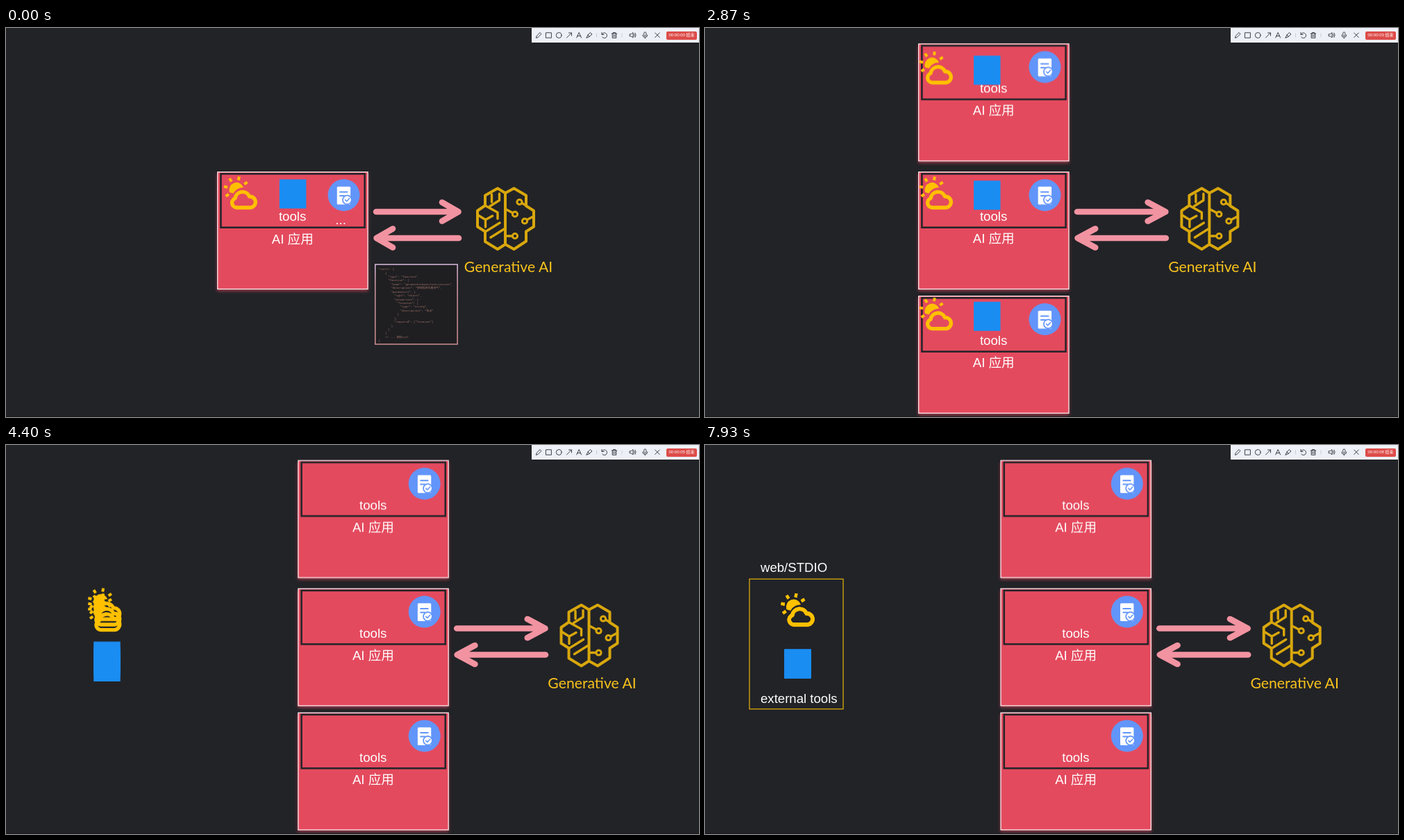
Recreate the animation shown at these times as an HTML page. Size 998 px wide and 561 px high, loop 8 s.

```html
<!DOCTYPE html>
<html lang="zh-CN">
<head>
<meta charset="utf-8">
<title>AI tools</title>
<style>
  @property --sec { syntax: "<integer>"; inherits: true; initial-value: 0; }

  html, body { margin: 0; width: 100%; height: 100%; overflow: hidden; background: #222327; }
  svg { position: absolute; left: 0; top: 0; width: 998px; height: 561px; }
  text, .timer { font-family: "Liberation Sans", Arial, "Noto Sans CJK SC", "Noto Sans CJK", sans-serif; }
  text { font-size: 18.6px; fill: #fff; }
  .mid { text-anchor: middle; }
  .line { fill: none; stroke-linecap: round; stroke-linejoin: round; }

  .timer {
    position: absolute; left: 951px; top: 5px; width: 44px; height: 11.5px;
    border-radius: 2px; background: #dd4c49; color: #fff;
    font-size: 6px; line-height: 11.5px; text-align: center; white-space: nowrap;
    animation: tick 8s step-end infinite;
  }
  .timer::before { counter-reset: s var(--sec); content: "00:00:0" counter(s) " 结束"; }

  /* Everything on the slide travels on the same curve by its own --dx, --dy. */
  .move { --dx: 121.3px; --dy: -.5px; animation: move 8s infinite; }
  .sun { --dx: -204.3px; --dy: calc(0px - var(--o)); }
  .map { --dx: -279.5px; --dy: calc(76.3px - var(--o)); }
  .shift { animation: shift 8s step-end infinite; }
  .stretch { transform-origin: 529px 0; animation: stretch 8s step-end infinite; }
  .dots { animation: cut 8s step-end infinite; }
  .code { animation: codeOut 8s linear infinite; }
  .copy { animation: copyIn 8s linear infinite; }
  .box { animation: boxIn 8s linear infinite; }
  .head { animation: headIn 8s linear infinite; }

  @keyframes move {
    0%, 31.9% { translate: 0 0; animation-timing-function: cubic-bezier(.38, 0, .667, .2); }
    46% { translate: calc(var(--dx) / 2) calc(var(--dy) / 2); animation-timing-function: cubic-bezier(.333, .8, .62, 1); }
    60.1%, 100% { translate: var(--dx) var(--dy); }
  }
  @keyframes shift { 0% { translate: 0 0; } 32.4%, 100% { translate: 4.4px 0; } }
  @keyframes stretch { 0% { scale: 1 1; } 32.4%, 100% { scale: 1.07 1; } }
  @keyframes cut { 0% { opacity: 1; } 32.4%, 100% { opacity: 0; } }
  @keyframes codeOut { 0%, 2.5% { opacity: 1; } 9%, 100% { opacity: 0; } }
  @keyframes copyIn { 0%, 13.5% { opacity: 0; } 20.5%, 100% { opacity: 1; } }
  @keyframes boxIn { 0%, 69% { opacity: 0; } 75%, 100% { opacity: 1; } }
  @keyframes headIn { 0%, 78% { opacity: 0; } 84%, 100% { opacity: 1; } }
  @keyframes tick {
    0% { --sec: 0; } 2.5% { --sec: 1; } 15% { --sec: 2; } 27.5% { --sec: 3; } 40% { --sec: 4; }
    52.5% { --sec: 5; } 65% { --sec: 6; } 77.5% { --sec: 7; } 90%, 100% { --sec: 8; }
  }
</style>
</head>
<body>
<svg viewBox="0 0 998 561">
  <defs>
    <linearGradient id="edge" x1="0" y1="0" x2="0" y2="1">
      <stop offset="0" stop-color="#dcbce0"/>
      <stop offset=".25" stop-color="#d39aa8"/>
      <stop offset="1" stop-color="#cf8f90"/>
    </linearGradient>
    <filter id="blur" x="-10%" y="-10%" width="120%" height="120%"><feGaussianBlur stdDeviation="2"/></filter>

    <g id="card">
      <rect x="304" y="210" width="217.5" height="169.5" fill="#e44a5e" opacity=".6" filter="url(#blur)"/>
      <rect x="304.7" y="207.7" width="216.3" height="168.8" fill="#e44a5e" stroke="#fbe9ec" stroke-width="1.3"/>
      <rect x="309.4" y="210.3" width="207.2" height="77.4" fill="none" stroke="#26252a" stroke-width="2.6"/>
      <circle cx="486.5" cy="241" r="23" fill="#6295fa"/>
      <rect x="476.7" y="228.8" width="19.4" height="25.6" rx="1.5" fill="#fff"/>
      <path class="line" d="M481 236.5H491.5M481 242H487" stroke="#6295fa" stroke-width="2"/>
      <circle cx="491.3" cy="247.8" r="6.4" fill="#fff" stroke="#6295fa" stroke-width="1.7"/>
      <path class="line" d="M488.5 247.8L490.7 250L494.5 245.8" stroke="#6295fa" stroke-width="1.6"/>
      <text class="mid" x="412.6" y="278">tools</text>
      <text class="mid" x="412.8" y="310.5">AI 应用</text>
    </g>

    <g id="sun" fill="#ffc000">
      <path d="M8 24A10.5 10.5 0 0 1 28 17Q18 17 13.5 25.5Z"/>
      <g id="rays" transform="translate(18 19.5)"></g>
      <path class="line" d="M18 46A7 7 0 0 1 16 32.5A10.7 10.7 0 0 1 36.5 30A8 8 0 0 1 38 46Z" stroke="#ffc000" stroke-width="5.4"/>
    </g>

    <rect id="map" width="38.5" height="42" fill="#1a8df2"/>

    <path id="arrow" class="line" d="M533 265H649M628 251.5L651.5 265L628 278.5" stroke="#f293a1" stroke-width="8.6"/>
  </defs>

  <rect width="998" height="561" fill="#222327"/>
  <rect y="560" width="998" height="1" fill="#161719"/>

  <g class="code">
    <rect x="531.7" y="341" width="118.4" height="115" fill="#1f1f22" stroke="url(#edge)" stroke-width="1.5"/>
    <g id="code"></g>
  </g>

  <g id="cards"></g>

  <g class="move">
    <g class="stretch">
      <use href="#arrow"/>
      <use href="#arrow" transform="rotate(180 592.5 284)"/>
    </g>
    <g class="shift">
      <g class="line" stroke="#d8a70d" stroke-width="4">
        <path d="M719 238L731.5 231.3L749 241.5V256.5L760 263.5V286.5L749 293.5V307.5L731.5 319L719 312L708 319L690 308V293.5L679 286.5V263.5L690 256V241.5L708 231.3ZV312"/>
        <path stroke-width="3.4" d="M699.5 240V251M710.5 239V248.5L697 257M690 256L708 266V275M680 270L690.5 276.5L700.5 271M690.5 276.5V287M690 294L711 281M698 302L718 289.5"/>
        <path stroke-width="3.4" d="M743 252.5L749 256M719 261L729.5 266.5M750.5 276.5L760 271.5M719 300H729"/>
        <g stroke-width="3">
          <circle cx="739.5" cy="251" r="3.6"/>
          <circle cx="733" cy="268.5" r="3.6"/>
          <circle cx="747" cy="278.5" r="3.6"/>
          <circle cx="733" cy="300" r="3.6"/>
        </g>
      </g>
      <text class="mid" x="723.5" y="351.7" style="font: 21.2px Lato, sans-serif; fill: #f8c31c">Generative AI</text>
    </g>
  </g>

  <g class="box">
    <rect x="64" y="193.3" width="135" height="187.4" fill="none" stroke="#d9a90e" stroke-width="1.3"/>
    <text x="80" y="372">external tools</text>
  </g>
  <text class="head" x="80" y="183">web/STDIO</text>

  <rect x="757" width="241" height="21" fill="#eef0f8"/>
  <g class="line" stroke="#3d3f48" stroke-width="1">
    <path d="M763.5 14L764.2 11.3L769 6.5L771 8.5L766.2 13.3Z"/>
    <rect x="777.8" y="6.8" width="7.6" height="7.4"/>
    <circle cx="796.2" cy="10.5" r="3.9"/>
    <path d="M807.5 14L814.5 7M810.5 7H814.5V11"/>
    <path d="M821.8 14L825.2 6.5L828.6 14M823 11.5H827.4"/>
    <path d="M836 14L838 10L841.5 6.5L844 9L840.2 12.4ZM838 10L840.2 12.4"/>
    <path d="M858 6.5V9.5H861M858.2 9.3A3.8 3.8 0 1 1 858.6 13"/>
    <path d="M872.3 8H879.7M874.5 8V6.5H877.5V8M873.2 8V14.3H878.8V8M875 10V12.5M877 10V12.5"/>
    <path d="M898.5 8.8H900.3L903 6.6V14L900.3 11.8H898.5ZM904.6 8.7Q906 10.3 904.6 12M906 7.2Q908.4 10.3 906 13.5"/>
    <path d="M918.7 7.5A1.6 1.6 0 0 1 921.9 7.5V10A1.6 1.6 0 0 1 918.7 10ZM916.8 10A3.5 3.5 0 0 0 923.8 10M920.3 13.5V15"/>
    <path d="M934.7 7L941.3 13.6M941.3 7L934.7 13.6"/>
    <path d="M850.5 8V13M887 8V13" stroke="#c9ccd8"/>
  </g>
</svg>
<div class="timer"></div>

<script>
  const byId = id => document.getElementById(id);

  byId("rays").innerHTML = [-123, -78, -33, 12, 57]
    .map(a => `<rect x="-2" y="-18.5" width="4" height="5.2" transform="rotate(${a})"/>`).join("");

  // Middle card first, then its copies above and below.
  byId("cards").innerHTML = [0, -184.8, 179].map(o => `
    <g class="${o ? "copy" : ""}" style="--o:${o}px" transform="translate(0 ${o})">
      <use class="move" href="#card"/>
      <text class="dots" x="474.3" y="282.5">...</text>
      <use class="move sun" href="#sun" x="314" y="213"/>
      <use class="move map" href="#map" x="393.8" y="218.3"/>
    </g>`).join("");

  const code = `"tools": [
 {
  "type": "function",
  "function": {
   "name": "getWeatherByCurrentLocation",
   "description": "获取指定位置天气",
   "parameters": {
    "type": "object",
    "properties": {
     "location": {
      "type": "string",
      "description": "地点"
     }
    },
    "required": ["location"]
   }
  }
 }
 // ... 其他tool
],`;
  byId("code").innerHTML = code.split("\n").map((line, i) => {
    const depth = line.search(/\S/);
    const x = depth ? 541.5 + 4.4 * depth : 536;
    return `<text x="${x}" y="${349.2 + 5.42 * i}" style="font:3.9px 'Liberation Mono','Noto Sans CJK SC',monospace;fill:#a9766a">${line.trim()}</text>`;
  }).join("");
</script>
</body>
</html>
```
